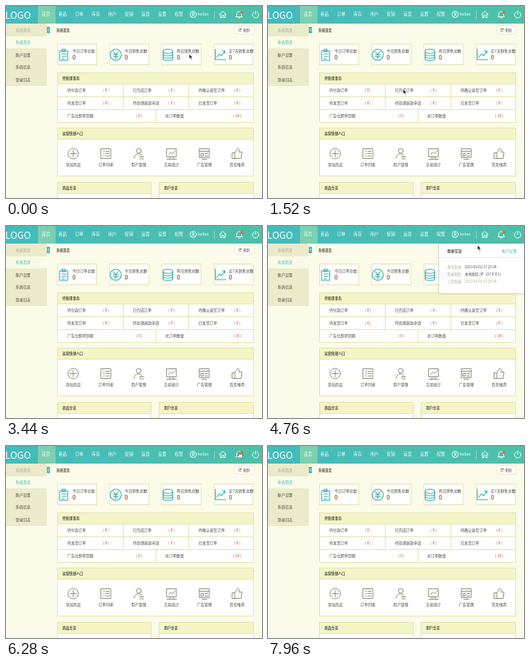
An HTML page with a canvas that plays this animation: 320 px wide and 240 px high, repeating every 8000 ms.

```html
<!DOCTYPE html>
<html lang="zh">
<head>
<meta charset="utf-8">
<title>系统首页</title>
<style>
html, body { margin: 0; width: 100%; height: 100%; overflow: hidden; background: #fbfbe9; }
canvas { display: block; width: 320px; height: 240px; }
</style>
</head>
<body>
<canvas id="stage"></canvas>
<script>
const canvas = document.getElementById('stage');
const ratio = window.devicePixelRatio || 1;
canvas.width = 320 * ratio;
canvas.height = 240 * ratio;
const ctx = canvas.getContext('2d');

const LOOP = 8000;
const TEAL = '#43bcb0', INK = '#4b4b42', OLIVE = '#8b8b70', RED = '#c2572c';
const PAGE = '#fbfbe9', LINE = '#e6e6b4', HEAD = '#f4f4c6', SIDE = '#ebebcb';
const FONT = '"Noto Sans CJK SC", "Noto Sans CJK", "Noto Sans", sans-serif';

function box(x, y, w, h, fill, stroke) {
  ctx.fillStyle = fill;
  ctx.fillRect(x, y, w, h);
  if (stroke) {
    ctx.strokeStyle = stroke;
    ctx.lineWidth = 1;
    ctx.strokeRect(x + .5, y + .5, w - 1, h - 1);
  }
}

function text(str, x, y, { size = 4.7, color = INK, weight = 400, align = 'left' } = {}) {
  ctx.font = `${weight} ${size}px ${FONT}`;
  ctx.fillStyle = color;
  ctx.textAlign = align;
  ctx.textBaseline = 'middle';
  ctx.fillText(str, x, y);
}

function icon(path, x, y, color, width = 1) {
  ctx.save();
  ctx.translate(x, y);
  ctx.strokeStyle = color;
  ctx.lineWidth = width;
  ctx.lineCap = ctx.lineJoin = 'round';
  ctx.stroke(new Path2D(path));
  ctx.restore();
}

const ring = (r, x = 0, y = 0) => `M${x + r} ${y}a${r} ${r} 0 1 0 ${-2 * r} 0a${r} ${r} 0 1 0 ${2 * r} 0`;

const ICONS = {
  clipboard: 'M-5 -5H5V7H-5ZM-2 -7H2V-4H-2ZM-2 -1H3M-2 2H3M-2 5H1',
  yen: ring(7) + 'M-3 -4L0 0L3 -4M-3 0H3M-3 2.5H3M0 0V5',
  coins: 'M-6 -4C-6 -8 6 -8 6 -4C6 -1 -6 -1 -6 -4V5C-6 8 6 8 6 5V-4M-6 -1C-6 2 6 2 6 -1M-6 2C-6 5 6 5 6 2',
  chart: 'M-6 -7V6H7M-4 3L-1 -1L2 1L6 -5M3 -5H6V-2',
  add: ring(6.5) + 'M-4 0H4M0 -4V4',
  list: 'M-6 -6H6V6H-6ZM-3 -3H-2M0 -3H4M-3 0H-2M0 0H4M-3 3H-2M0 3H4',
  users: ring(3, 0, -3.5) + 'M-6 6C-6 -1 3 -1 4 3M1 4H6M1 6.5H6',
  stats: 'M-6 -6H6V4H-6ZM-4 1L-1 -2L1 0L5 -4M-3 7L-1 4M3 7L1 4M-6 7H6',
  advert: 'M-6 -6H6V5H-6ZM-6 -3H6M-4 0H-1V3H-4ZM1 0H4M1 3H4M-3 7H3',
  thumb: 'M-6 -1H-3V6H-6ZM-3 -1L0 -6C3 -7 3 -4 2 -2H6L5 6H-3',
  home: 'M-4 0L0 -4L4 0M-3 -1V4H-1V1H1V4H3V-1',
  bell: 'M-4 2.5H4L3 1V-1C3 -5 -3 -5 -3 -1V1ZM-1 4H1',
  power: 'M-2 -3A4 4 0 1 0 2 -3M0 -4V0',
  person: ring(4) + ring(1.3, 0, -1) + 'M-2.5 3C-2 .5 2 .5 2.5 3'
};

function header() {
  const shade = ctx.createLinearGradient(0, 0, 320, 0);
  shade.addColorStop(0, '#43bbbd');
  shade.addColorStop(1, '#4dc0a8');
  box(0, 0, 320, 22, shade);
  box(40, 0, 22, 22, '#7bd0b0');
  text('LOGO', -1, 11, { size: 12, color: '#fff' });
  ['首页', '商品', '订单', '库存', '用户', '促销', '运营', '设置', '权限'].forEach((label, i) =>
    text(label, 50 + i * 20.75, 10.5, { size: 5.2, color: '#fff', weight: 500, align: 'center' }));
  icon(ICONS.person, 234, 10.5, '#fff', .8);
  text('kefan', 240, 10.5, { size: 5.2, color: '#fff', weight: 500 });
  box(260, 6, .6, 10, '#b4e2d8');
  icon(ICONS.home, 271, 10.5, '#fff', .9);
  icon(ICONS.bell, 291.5, 11, '#fff', .9);
  ctx.fillStyle = '#df6940';
  ctx.beginPath();
  ctx.arc(295, 8, 2, 0, 7);
  ctx.fill();
  icon(ICONS.power, 312, 10.5, '#fff', .9);
}

function sidebar() {
  box(0, 22, 51, 78, SIDE);
  box(0, 38, 51, 15, '#fafae8');
  text('系统首页', 12, 30, { color: '#a6a691' });
  text('系统首页', 12, 45.5, { color: TEAL });
  ['账户设置', '系统信息', '登录日志'].forEach((label, i) => text(label, 12, 61 + i * 15.5));
  box(51, 26, 4, 8, TEAL);
  icon('M1 -1.5L-1 0L1 1.5', 53, 30, '#fff', .6);
}

function panel(title, x, y, w, h) {
  box(x, y, w, h, '#fff', LINE);
  box(x, y, w, 15, HEAD, LINE);
  text(title, x + 6.5, y + 7.5, { size: 4.3, weight: 700 });
}

function dashboard() {
  text('系统首页', 63, 30, { size: 4.2, weight: 700 });
  ctx.fillStyle = '#fff';
  ctx.strokeStyle = LINE;
  ctx.lineWidth = .7;
  ctx.beginPath();
  ctx.roundRect(286, 25, 24, 10, 2);
  ctx.fill();
  ctx.stroke();
  icon('M1.5 -1A1.8 1.8 0 1 0 1.5 1M1.5 -2V-.7H.2', 292.5, 30, INK, .6);
  text('刷新', 296.5, 30, { size: 4.2, weight: 500 });

  [['clipboard', '今日订单总数'], ['yen', '今日销售总额'],
   ['coins', '昨日销售总额'], ['chart', '近7天销售总额']].forEach(([name, label], i) => {
    const x = 64 + i * 65.2;
    box(x, 47, 50, 27, '#fff', LINE);
    icon(ICONS[name], x + 8, 61, '#3fafa5', 1.1);
    text(label, x + 19, 56);
    text('0', x + 19, 64.5, { size: 7, color: RED, weight: 700 });
  });

  panel('待处理事务', 64, 83, 246, 63);
  const rows = [['待付款订单', '已完成订单', '待确认退货订单'],
                ['待发货订单', '待处理退款申请', '已发货订单']];
  rows.forEach((row, r) => row.forEach((label, c) => {
    const x = 64 + c * 82, y = 105.5 + r * 15.5;
    text(label, x + 12.5, y);
    text('( 0 )', x + 61, y, { color: RED, align: 'center', weight: 500 });
    if (c) box(x, 98, 1, 31, LINE);
  }));
  box(64, 113, 246, 1, LINE);
  box(64, 129, 246, 1, LINE);
  box(187, 129, 1, 17, LINE);
  text('广告位即将到期', 76.5, 137);
  text('( 0 )', 166.5, 137, { color: RED, align: 'center', weight: 500 });
  text('总订单数量', 199, 137);
  text('( 14 )', 289, 137, { color: RED, align: 'center', weight: 500 });

  panel('运营快捷入口', 64, 152, 246, 61);
  [['add', '添加商品'], ['list', '订单列表'], ['users', '用户管理'],
   ['stats', '交易统计'], ['advert', '广告管理'], ['thumb', '首页推荐']].forEach(([name, label], i) => {
    const x = 84 + i * 41;
    icon(ICONS[name], x, 184.5, OLIVE, .9);
    text(label, x, 198.5, { align: 'center' });
  });
  panel('商品总览', 64, 220, 118, 40);
  panel('用户总览', 191, 220, 119, 40);
}

function loginPopup() {
  ctx.save();
  ctx.shadowColor = '#77775588';
  ctx.shadowBlur = 3 * ratio;
  box(214, 22, 110, 62, '#fff');
  ctx.restore();
  text('登录信息', 224, 31, { size: 4.6, weight: 700 });
  text('账户设置', 311, 31, { color: TEAL, align: 'right' });
  box(214, 39, 106, .7, LINE);
  [['本次登录:', '2019-03-02 17:23:34'], ['登录地区:', '本地地区 (IP: 127.0.0.1)'],
   ['上次登录:', '2019-03-02 17:23:34']].forEach(([label, value], i) => {
    const y = 51 + i * 9.3;
    text(label, 224, y, { size: 4.3, color: '#aaa98b' });
    text(value, 246, y, { size: 4.3, color: i === 2 ? '#aaa98b' : INK });
  });
}

// Pointer stops: time, x, y.
const STOPS = [
  [0, 229, 60], [480, 229, 60], [1240, 169, 104], [1600, 169, 104],
  [2240, 251, 104], [2560, 251, 104], [3200, 326, 66], [3560, 326, 30],
  [4120, 244, 10], [4480, 250, 14], [4760, 262, 24], [5200, 262, 24],
  [5720, 290, 8], [6440, 290, 8], [6880, 300, -14], [8000, 300, -14]
];

function pointerAt(t) {
  const i = STOPS.findIndex(stop => stop[0] > t);
  const [t0, x0, y0] = STOPS[i - 1], [t1, x1, y1] = STOPS[i];
  const p = (t - t0) / (t1 - t0), ease = p * p * (3 - 2 * p);
  return [x0 + (x1 - x0) * ease, y0 + (y1 - y0) * ease];
}

function pointer(x, y, isHand) {
  const shape = isHand
    ? 'M1 0V4L0 3L-1 4L1 7H5L6 3L2 2V0Z'
    : 'M0 0V6L1.4 4.8L2.4 7L3.4 6.5L2.5 4.4H4.3Z';
  ctx.save();
  ctx.translate(x, y);
  ctx.fillStyle = isHand ? '#fff' : '#111';
  ctx.strokeStyle = isHand ? '#333' : '#fff';
  ctx.lineWidth = .6;
  const path = new Path2D(shape);
  ctx.fill(path);
  ctx.stroke(path);
  ctx.restore();
}

function draw(now) {
  const t = now % LOOP;
  ctx.setTransform(ratio, 0, 0, ratio, 0, 0);
  box(0, 0, 320, 240, PAGE);
  dashboard();
  sidebar();
  header();
  if (t >= 4040 && t < 5480) loginPopup();
  const [x, y] = pointerAt(t);
  pointer(x, y, y < 20);
  requestAnimationFrame(draw);
}
requestAnimationFrame(draw);
</script>
</body>
</html>
```
